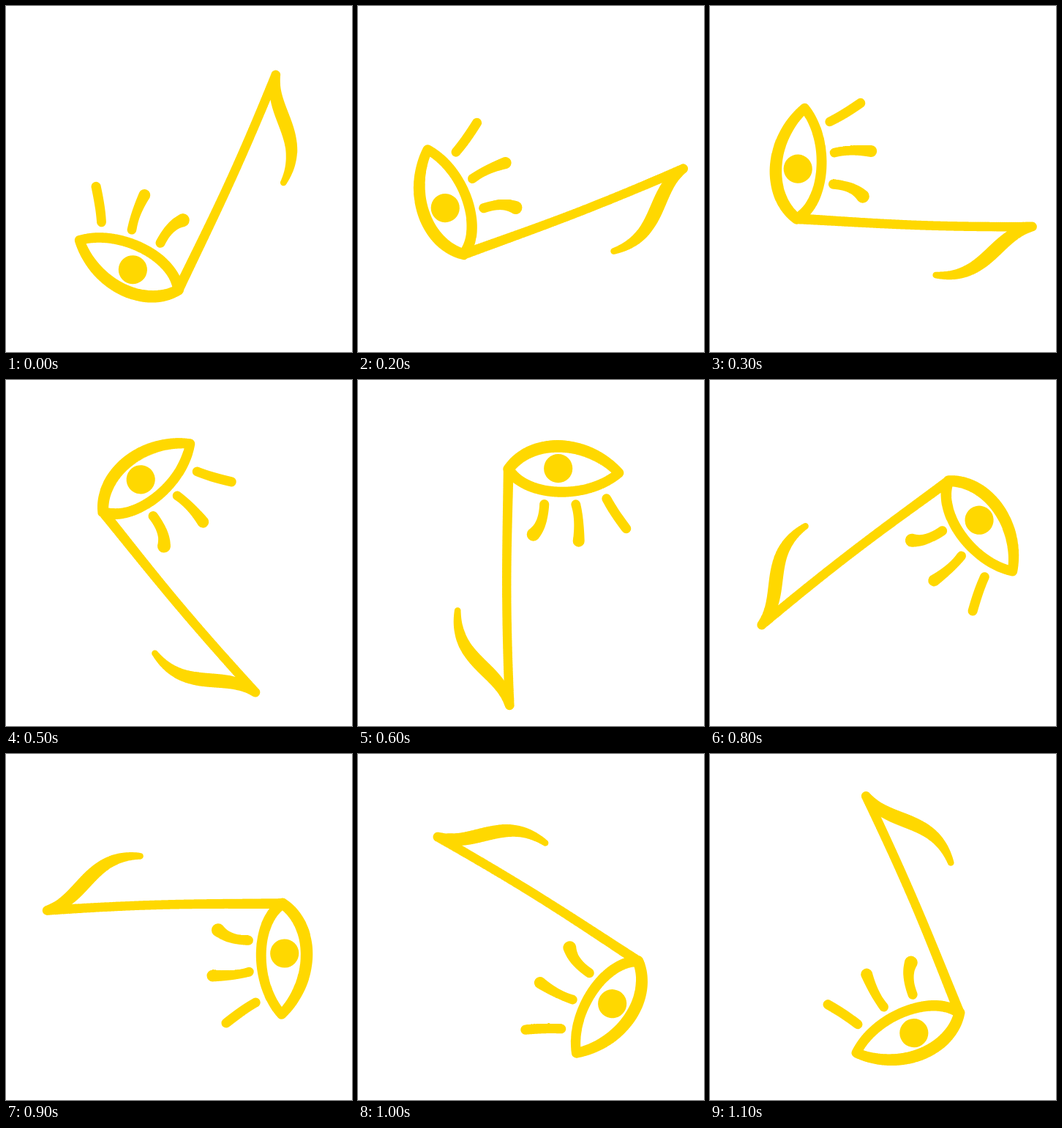
Recreate the animation shown at these times as an HTML page with a canvas. Size 473 by 472 pixels, loop 1200 ms.

```html
<!DOCTYPE html>
<html lang="en">
<head>
<meta charset="utf-8">
<title>Spinning eye note</title>
<style>
  html, body { margin: 0; width: 100%; height: 100%; overflow: hidden; background: #fff; }
  canvas { display: block; }
</style>
</head>
<body>
<canvas id="stage" width="473" height="472"></canvas>
<script>
const ctx = document.getElementById('stage').getContext('2d');
const W = 473, H = 472;
const CENTER = [249.7, 251.2];  // on the stage
const PIVOT = [248, 251.5];     // the same point in the drawing
const STEP = 100;

// The drawing turns in uneven, hand-made steps (degrees).
const TURNS = [-155.3, -133, -111, -87.8, -64, -40, 0, 26, 52.7, 88.6, 122, 156.9];

const ink = new Path2D();

function dot(x, y, r) {
  ink.moveTo(x + r, y);
  ink.arc(x, y, r, 0, Math.PI * 2);
}

// Brush stroke along a cubic curve; r0, rm, r1 are its radii at start, middle and end.
function brush(a, b, c, d, r0, rm, r1) {
  const n = 160;
  for (let i = 0; i <= n; i++) {
    const t = i / n, s = 1 - t;
    const at = k => s * s * s * a[k] + 3 * s * s * t * b[k] + 3 * s * t * t * c[k] + t * t * t * d[k];
    const r = s * (s - t) * r0 + 4 * s * t * rm + t * (t - s) * r1;
    dot(at(0), at(1), r);
  }
}

const joint = [204, 122], corner = [355, 127], tip = [205.5, 444];

brush(joint, [235, 79], [310, 80], corner, 7.5, 8.3, 6.7);         // upper lid
brush(joint, [228, 161], [312, 164], corner, 7.5, 7, 6.7);         // lower lid
dot(272, 121, 19.6);                                               // pupil
brush(joint, [202, 230], [199, 290], tip, 7, 6.3, 6.5);            // stem
brush(tip, [193, 393], [130, 385], [134.5, 315], 6.5, 9.3, 4.4);   // flag

// lashes
brush([253, 170], [252, 190], [247, 202], [238, 211], 6.6, 7, 9);
brush([296, 170], [300, 185], [301, 201], [300, 220], 6.4, 6.4, 8);
brush([338, 162], [345, 175], [353, 187], [365, 203], 6.4, 6.6, 6.6);

function draw(time) {
  const turn = TURNS[Math.floor(time / STEP) % TURNS.length];
  ctx.setTransform(1, 0, 0, 1, 0, 0);
  ctx.fillStyle = '#fff';
  ctx.fillRect(0, 0, W, H);
  ctx.translate(...CENTER);
  ctx.rotate(turn * Math.PI / 180);
  ctx.translate(-PIVOT[0], -PIVOT[1]);
  ctx.fillStyle = '#ffd800';
  ctx.fill(ink);
}

const start = performance.now();
function loop() {
  draw(performance.now() - start);
  requestAnimationFrame(loop);
}
loop();
</script>
</body>
</html>
```
